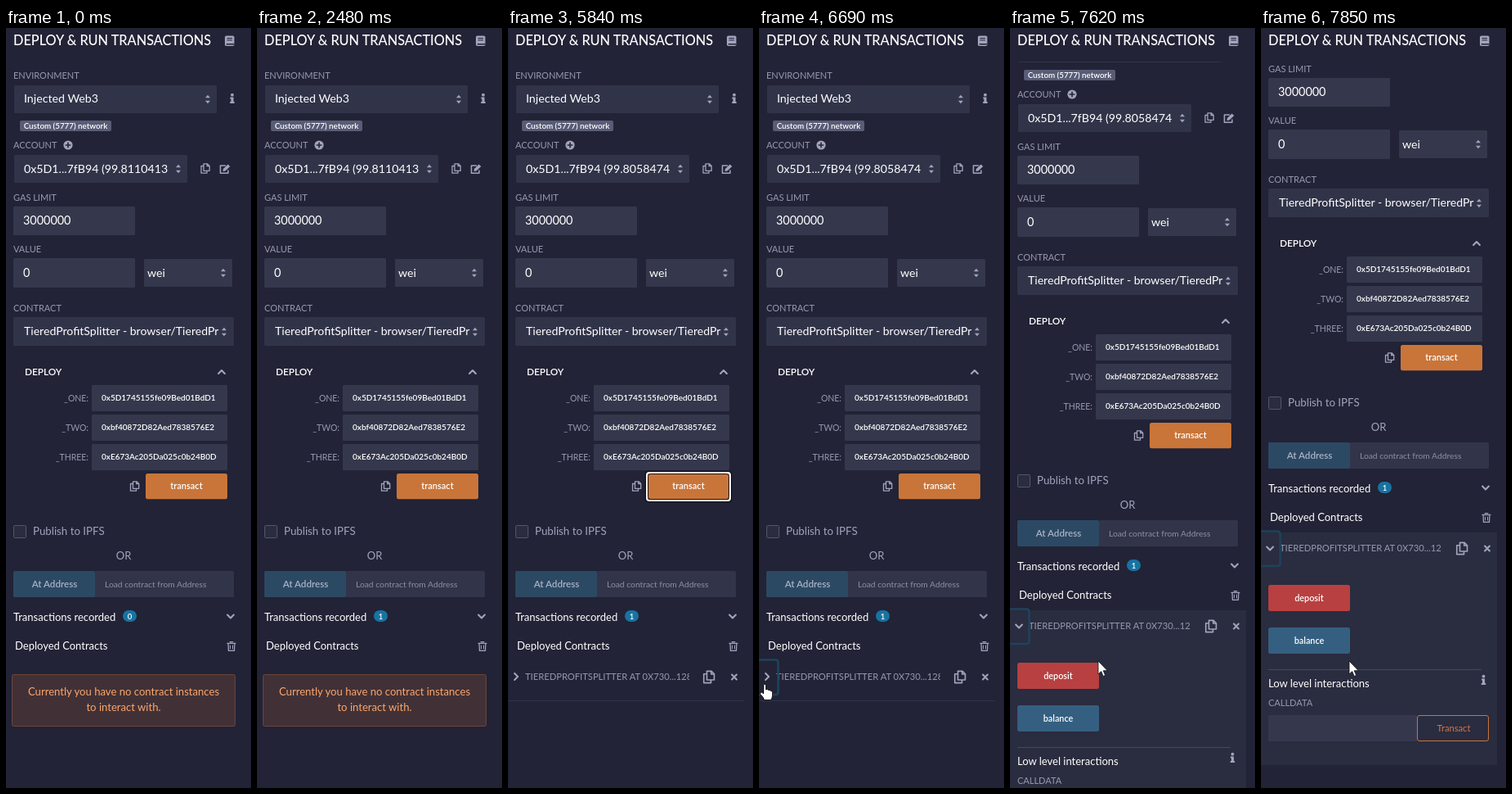
Write an HTML page that moves like this. It is 300 px wide and 928 px high and loops after 8000 ms.

```html
<!DOCTYPE html>
<html lang="en">
<head>
<meta charset="utf-8">
<title>Deploy panel</title>
<style>
  html, body { margin: 0; width: 100%; height: 100%; overflow: hidden; background: #222336; }
  svg { display: block; }
  text { font-family: Lato, "Open Sans", sans-serif; white-space: pre; }
</style>
</head>
<body>
<svg id="stage" width="300" height="928" viewBox="0 0 300 928"></svg>
<script>
const LOOP = 8000, TICK = 77.78, FIRST = 150;
const BG = '#222336', MUTED = '#a2a3bd', LABEL = '#9798b1', WHITE = '#fff';
const FIELD = '#35384c', SELECT = '#313449', ORANGE = '#c97539';

const text = (x, y, size, str, fill = WHITE, extra = '') =>
  `<text x="${x}" y="${y}" font-size="${size}" fill="${fill}" ${extra}>${str}</text>`;
const middle = 'text-anchor="middle" ', bold = 'font-weight="600" ';
const box = (x, y, w, h, fill, extra = 'rx="1.5"') =>
  `<rect x="${x}" y="${y}" width="${w}" height="${h}" fill="${fill}" ${extra}/>`;
const at = (x, y, body) => `<g transform="translate(${x} ${y})">${body}</g>`;
const clipRight = (x, body) => `<svg width="${x}" height="1100">${body}</svg>`;
const group = (id, body) => `<g id="${id}">${body}</g>`;
const label = (y, str) => text(9, y, 11, str, LABEL);
const line = (d, width, color = MUTED) =>
  `<path d="${d}" fill="none" stroke="${color}" stroke-width="${width}" stroke-linecap="round" stroke-linejoin="round"/>`;
const outline = (x, y, w, h, color, width) =>
  box(x, y, w, h, 'none', `rx="3" stroke="${color}" stroke-width="${width}"`);

// Icons are centred on the given point
const arrows = (x, y) => at(x, y, `<path d="M-3-1.8L0-5.2 3-1.8ZM-3 1.8L0 5.2 3 1.8Z" fill="${MUTED}"/>`);
const chevron = (x, y, turn, color = MUTED) =>
  at(x, y, `<g transform="rotate(${turn})">${line('M-3.9 2L0-2 3.9 2', 2.1, color)}</g>`);
const copy = (x, y, k = 1) => at(x, y, `<g transform="scale(${k})">` +
  line('M-2-5.7H2.5L5.2-3V2.8H-2ZM2.2-5.5V-2.8H5M-2.4-3H-5V5.7H2V3.2', 1.3) + '</g>');
const info = (x, y) => at(x, y,
  `<circle cy="-4.3" r="1.9" fill="${MUTED}"/><path d="M-2.5-1.5H1.6V4H2.7V6H-2.7V4H-1.5V.5H-2.5Z" fill="${MUTED}"/>`);
const cross = (x, y) => at(x, y, line('M-2.9-2.9L2.9 2.9M2.9-2.9L-2.9 2.9', 2.1));
const book = at(273.5, 15.8, box(-5.5, -6.3, 11.5, 12.6, MUTED, 'rx="1.8"') +
  line('M-2.6-3.3H3.2M-2.6-1H3.2', 1, BG) + line('M-3.2 4H5.5', 1.5, BG));
const plus = at(76, 143, `<circle r="5.6" fill="${MUTED}"/>` + line('M-2.7 0H2.7M0-2.7V2.7', 1.6, BG));
const edit = at(268, 172, line('M.5-4H-5.5V5.3H4V2', 1.5) +
  `<path d="M-2.5 3L-2 0 3.7-5.6 6.4-3 .6 2.6Z" fill="${MUTED}"/>`);
const trash = at(276, 755, line('M-5-3.7H5M-1.8-5.4H1.8M-3.9-3.5L-3.5 5.4H3.5L3.9-3.5', 1.3) +
  line('M-1.5-1V3M1.5-1V3', 1));

const argument = (y, name, value) =>
  text(101, y + 19.5, 10.5, name, LABEL, 'text-anchor="end"') + box(105, y, 166, 32, FIELD) +
  clipRight(259, text(117, y + 19.3, 10, value, WHITE, bold));
const button = (y, str, fill) =>
  box(9, y, 100, 32, fill, 'rx="2.5"') + text(59, y + 19.5, 10.8, str, WHITE, middle + bold);

const form =
  label(62, 'ENVIRONMENT') + box(10, 70, 248, 34, SELECT) +
  text(22, 91, 14.2, 'Injected Web3') + arrows(247, 87) + info(277, 86) +
  box(17, 113, 112, 13, '#595c76', 'rx="2"') + text(73, 123, 9.8, 'Custom (5777) network', WHITE, middle + bold) +
  label(147, 'ACCOUNT') + plus + box(10, 155, 212, 34, SELECT) +
  clipRight(199, text(22, 177, 14.2, '', WHITE, 'id="account"')) +
  arrows(211, 172) + copy(244, 171.5) + edit +
  label(211, 'GAS LIMIT') + box(9, 218, 149, 35, FIELD) + text(21, 240, 14.4, '3000000') +
  label(274, 'VALUE') + box(9, 281, 149, 36, FIELD) + text(21, 304, 14.4, '0') +
  box(169, 282, 108, 34, FIELD) + text(173, 304, 14.2, 'wei') + arrows(266, 299) +
  label(346, 'CONTRACT') + box(9, 353, 270, 35, SELECT) +
  clipRight(264, text(22, 375, 14.1, 'TieredProfitSplitter - browser/TieredPr')) + arrows(267, 371);

const deploy =
  text(23, 424, 11.8, 'DEPLOY', WHITE, bold) + chevron(264, 420, 0) +
  argument(436, '_ONE:', '0x5D1745155fe09Bed01BdD1') +
  argument(472, '_TWO:', '0xbf40872D82Aed7838576E2') +
  argument(508, '_THREE:', '0xE673Ac205Da025c0b24B0D') +
  copy(157.5, 559.5) + box(171, 544, 100, 31.3, ORANGE, 'rx="2.5" id="transact"') +
  text(221, 563.3, 11, 'transact', WHITE, middle + bold) +
  group('ring', outline(168.5, 541.5, 105, 37, '#12131b', 1.5) +
    outline(171.5, 544.5, 99, 31, '#12131b', 1) + outline(170, 543, 102, 34, WHITE, 2));

const lists =
  box(9.5, 607.5, 15, 15, '#2a2c3f', 'rx="1" stroke="#53566d"') +
  text(33, 619.3, 13.3, 'Publish to IPFS', MUTED) + text(144, 648.8, 13, 'OR', MUTED, middle) +
  box(9, 663, 100, 32, '#2c4963') + text(59.5, 683, 11.6, 'At Address', '#a9b3c6', middle + bold) +
  box(109, 663, 170, 32, '#32354a') + text(121, 682.5, 10.3, 'Load contract from Address', '#8c8ea6') +
  text(9, 723.7, 13, 'Transactions recorded') + box(143, 711, 17, 14, '#1873a2', 'rx="7"') +
  text(151.5, 721.5, 9.5, '', WHITE, middle + bold + 'id="count"') + chevron(275, 718.5, 180) +
  text(11, 759.3, 13, 'Deployed Contracts') + trash;

const alertBox = group('alert',
  box(7.5, 789.5, 273, 63, '#413136', 'rx="2" stroke="#6d4538"') +
  text(144, 815, 13.1, 'Currently you have no contract instances', '#fba56b', middle) +
  text(144, 834, 13.1, 'to interact with.', '#fba56b', middle));

const title = 'TIEREDPROFITSPLITTER AT 0X730...12';
const instance = group('instance',
  group('closed', box(0, 821, 289, 1, '#303348', '') + chevron(10, 792, 90) +
    clipRight(222, text(21, 796, 11.2, title + '8', LABEL))) +
  group('open', box(0, 773, 289, 284, '#2a2c3f', '') + chevron(11, 792.5, 180) +
    text(23, 796, 11.2, title, LABEL) +
    button(837, 'deposit', '#b84040') + button(889, 'balance', '#355f80') +
    box(9, 940, 261, 1, '#45485c', '') + text(9, 962, 13, 'Low level interactions') + info(272.5, 953) +
    label(985, 'CALLDATA') + box(9, 996, 182, 32, FIELD) +
    box(191.5, 996.5, 87, 31, 'none', `rx="2.5" stroke="${ORANGE}"`) +
    text(236, 1016, 11.2, 'Transact', '#d5744a', middle)) +
  copy(246, 792.5, 1.25) + cross(277, 792.5)) +
  group('toggleRing', outline(-4, 771.5, 27.5, 42.5, '#1d435c', 2.6));

const cursor = group('cursor',
  '<path id="arrow" d="M0 0V16L3.7 12.6 6.1 18.5 8.6 17.4 6.2 11.7H11.3Z" fill="#fff" stroke="#111" stroke-width=".8"/>' +
  '<path id="hand" d="M-1.5 12V1.5Q0-1 1.5 1.5V7Q3.3 5.5 4.4 7.5 6.2 6.5 7.2 8.4 9.5 7.8 9.5 10.5V14Q9.5 17 7.5 19.5H-.5Q-1 17-5.3 12.5-6 9.5-3.5 10Z" fill="#fff" stroke="#111"/>');

document.getElementById('stage').innerHTML = box(0, 0, 300, 928, BG, '') +
  `<svg y="41" width="300" height="887" viewBox="0 41 300 887">${group('page', form + deploy + lists + alertBox + instance)}</svg>` +
  text(9, 21.3, 16.3, 'DEPLOY &amp; RUN TRANSACTIONS', WHITE, 'font-weight="500"') + book + cursor;

const $ = id => document.getElementById(id);

// Pointer visits: [tick, x, y]; it is off the panel between them
const visits = [
  [[0, 278, 899], [5, 256, 715], [10, 222, 564], [12, 234, 558], [28, 234, 558], [29, 288, 565]],
  [[61, 255, 890], [66, 205, 853], [71, 121, 817], [72, 31, 792]],
  [[77, 2, 806], [79, 10, 804], [81, 7, 801], [89, 7, 801], [90, 52, 786], [91, 108, 773], [110, 108, 773]],
];
const scrollSteps = [18, 62, 107, 141, 157];

function pointerAt(tick) {
  const path = visits.find(v => tick >= v[0][0] && tick <= v[v.length - 1][0]);
  if (!path) return null;
  const i = Math.max(1, path.findIndex(p => p[0] >= tick));
  const [a, b] = [path[i - 1], path[i]], u = (tick - a[0]) / (b[0] - a[0]);
  return [a[1] + (b[1] - a[1]) * u, a[2] + (b[2] - a[2]) * u];
}

const show = (id, on) => $(id).setAttribute('visibility', on ? 'inherit' : 'hidden');
const within = (v, from, to) => v >= from && v < to;

function render(time) {
  const tick = Math.floor((time - FIRST) / TICK + 0.15);
  const deployed = tick >= 66, open = tick >= 85;
  const hover = within(tick, 10, 29);
  const scroll = tick < 95 ? 0 : scrollSteps[Math.min(4, tick - 95)];

  $('page').setAttribute('transform', `translate(0 ${-scroll})`);
  $('account').textContent = '0x5D1...7fB94 (99.' + (tick < 68 ? '8110413' : '8058474');
  $('count').textContent = tick < 15 ? '0' : '1';
  $('transact').setAttribute('fill', hover ? '#ad622d' : ORANGE);
  show('ring', within(tick, 13, 21) || within(tick, 62, 83));
  show('alert', !deployed);
  show('instance', deployed);
  show('closed', deployed && !open);
  show('open', open);
  show('toggleRing', tick >= 83);

  const pos = pointerAt(tick), hand = hover || within(tick, 77, 90);
  show('cursor', pos);
  show('arrow', pos && !hand);
  show('hand', pos && hand);
  if (pos) $('cursor').setAttribute('transform', `translate(${pos[0]} ${pos[1]})`);
}

function loop() {
  render(performance.now() % LOOP);
  requestAnimationFrame(loop);
}
loop();
</script>
</body>
</html>
```
